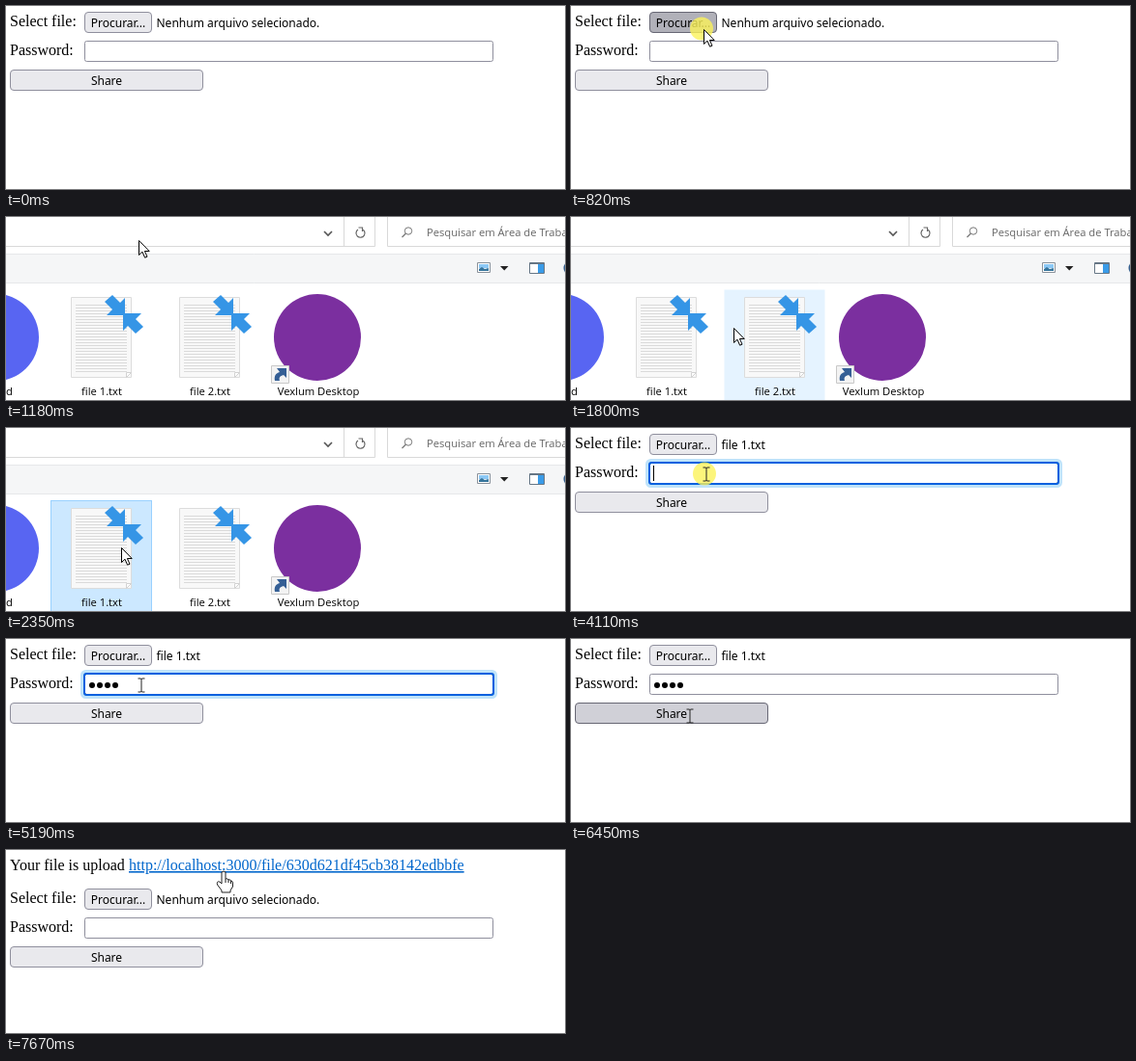
An HTML page for the animation above (8 s loop, 578x190 px).

```html
<!DOCTYPE html>
<html lang="pt">
<head>
<meta charset="utf-8">
<style>
  html, body { margin: 0; width: 100%; height: 100%; overflow: hidden; background: #fff; }
  svg { display: block; width: 578px; height: 190px; }
  .serif { font: 16px "Liberation Serif", serif; }
  .ui { font: 12px "Noto Sans", sans-serif; }
  .shell { font: 11.2px "Open Sans", sans-serif; }
  .control { stroke: #8f8f9d; }
  .button { fill: #e9e9ed; }
  .control.hover { stroke: #676774; }
  .button.hover { fill: #d0d0d7; }
  .button.press { fill: #b1b1b9; }
  .item { fill: none; }
  .item.hover { fill: #e5f3ff; }
  .item.selected { fill: #cce8ff; stroke: #99d1ff; }
  .mid { text-anchor: middle; }
</style>
</head>
<body>
<svg viewBox="0 0 578 190">
  <defs>
    <g id="doc">
      <path d="M67.5 83.5h62v83h-62z" fill="#f8f8f8" stroke="#dcdcdc"/>
      <path d="M98.5 91v70" stroke="#dadada" stroke-width="53" stroke-dasharray="1 2"/>
      <path d="M129.5 161.5h-5v5z" fill="#fff" stroke="#d2d2d2"/>
      <path id="squeeze" d="M123 102V84l-5 5-8-8-8 7 8 8-6 6z" fill="#3595e6"/>
      <use href="#squeeze" transform="rotate(180 122 101)"/>
    </g>
  </defs>

  <g id="page">
    <g id="message" class="serif">
      <text x="4" y="21">Your file is upload</text>
      <text x="127" y="21" fill="#0066cc" text-decoration="underline">http://localhost:3000/file/630d621df45cb38142edbbfe</text>
    </g>
    <g id="form">
      <text class="serif" x="4" y="21">Select file:</text>
      <text class="serif" x="4" y="51">Password:</text>
      <rect id="browse" class="control button" x="81.5" y="6.5" width="69" height="21" rx="3.5"/>
      <text class="ui mid" x="116" y="22">Procurar...</text>
      <text id="chosen" class="ui" x="155.5" y="22"></text>
      <rect id="field" class="control" x="81.5" y="36.5" width="422" height="21" rx="2" fill="#fff"/>
      <g id="focus" fill="none">
        <rect x="78.5" y="33.5" width="428" height="27" rx="4" stroke="#bfe3fa" stroke-width="3"/>
        <rect x="81" y="36" width="423" height="22" rx="2" stroke="#0060df" stroke-width="2"/>
      </g>
      <g id="dots"></g>
      <path id="caret" d="M85.5 39v16" stroke="#000"/>
      <rect id="share" class="control button" x="4.5" y="66.5" width="199" height="21" rx="3.5"/>
      <text class="ui mid" x="104" y="82">Share</text>
    </g>
  </g>

  <g id="dialog">
    <path d="M0 0h578v190H0z" fill="#fff"/>
    <path d="M0 30.5h381.5V0M349.5 0v30M394.5 0v30.5H578" fill="none" stroke="#d9d9d9"/>
    <path d="M329 15l4 4 4-4" fill="none" stroke="#555" stroke-width="1.6"/>
    <path d="M368 12.5a4.5 4.5 0 1 1-4 .5M364.500 11h4v4" fill="none" stroke="#666" stroke-width="1.2"/>
    <path d="M413.5 17l-4 4" stroke="#777" stroke-width="1.3"/>
    <circle cx="416" cy="14.5" r="3.7" fill="none" stroke="#777"/>
    <text class="shell" x="435" y="20" fill="#666">Pesquisar em Área de Trabalho</text>
    <path d="M0 38h578v31H0z" fill="#f5f6f7"/>
    <path d="M0 38.5h578M0 68.5h578" stroke="#e6e8ea"/>
    <path d="M487.5 47.5h13v10h-13z" fill="#fff" stroke="#8a929b"/>
    <path d="M489 49h10v4h-10z" fill="#8cc8f5"/>
    <path d="M489 56v-2l3-2 3 2 4-1v3z" fill="#35749b"/>
    <path d="M511 51h8.5l-4.250 4.5z" fill="#222"/>
    <path d="M541.5 47.5h15v11h-15z" fill="#fff" stroke="#667685"/>
    <path d="M550 48h6v10h-6z" fill="#3a9be8"/>
    <path d="M541 48.5h16" stroke="#667685"/>
    <circle cx="584" cy="53" r="7.5" fill="#35608f"/>
    <rect id="item1" class="item" x="46.5" y="75.5" width="104" height="120"/>
    <rect id="item2" class="item" x="158.5" y="75.5" width="104" height="120"/>
    <use href="#doc"/>
    <use href="#doc" x="112"/>
    <circle cx="-11.5" cy="125" r="45.5" fill="#5865f2"/>
    <circle cx="322" cy="125" r="45" fill="#7b2f9f"/>
    <path d="M274.5 154.5h18v18h-18z" fill="#f3f3f3" stroke="#c8c8c8"/>
    <path d="M278 170c-1-5 1-8 5-9l-3-4h10v10l-3-3c-4 1-5 3-4 6z" fill="#355f95"/>
    <g class="shell mid">
      <text x="3.5" y="185">d</text>
      <text x="99" y="185">file 1.txt</text>
      <text x="211" y="185">file 2.txt</text>
      <text x="323" y="185">Vexlum Desktop</text>
    </g>
  </g>

  <g id="cursor">
    <circle id="glow" cx="-2" cy="-.5" r="12" fill="#fbf25a"/>
    <path id="arrow" d="M.5.5v15l3.500-3.300 2.600 6 2.400-1-2.600-5.700h4.800z" fill="#fff" stroke="#000"/>
    <path id="beam" d="M-3.5-7h3l.5.5.5-.5h3M0-7V7M-3.5 7h3l.5-.5.5.5h3" fill="none" stroke="#222"/>
    <path id="hand" d="M-2 1Q0-1 2 1V8Q4 7 5 9Q7 8 7.5 10Q9.5 10 9.5 12V16L7 20V22H-2V20L-6.500 14Q-7.500 10-4 11L-2 13ZM2 8v4M5 9v3M7.500 10v3" fill="#fff" stroke="#222"/>
  </g>
</svg>
<script>
const LOOP = 8000;
const $ = id => document.getElementById(id);
const show = (id, on) => $(id).style.display = on ? '' : 'none';
const flag = (id, name, on) => $(id).classList.toggle(name, on);
const clamp = v => Math.max(0, Math.min(1, v));

for (let i = 0; i < 4; i++)
  $('dots').innerHTML += `<circle cx="${89 + 8 * i}" cy="48" r="3"/>`;

// start, end, steps, from, bend (quadratic control point), to
const moves = [
  [70, 550, 8, [310, 132], [230, 75], [137, 24]],
  [1380, 1940, 9, [137, 24], [258, 112], [119, 124]],
  [2750, 2940, 3, [119, 124], [123, 120], [125, 113]],
  [3010, 3080, 2, [125, 113], [125.5, 109], [126, 105]],
  [3150, 3770, 9, [126, 105], [134, 75], [140, 51]],
  [3840, 3910, 2, [140, 51], [140, 49], [140, 48]],
  [6050, 6240, 4, [140, 48], [130, 62], [123, 80]],
  [7250, 7670, 7, [123, 80], [178, 55], [225, 22]],
];
const clicks = [[820, 960], [2140, 2210], [2280, 2350], [4110, 4310], [6310, 6450]];
const keys = [4840, 4910, 4990, 5190];

function pointer(t) {
  const [t0, t1, n, a, b, c] = moves.findLast(m => t >= m[0]) || moves[0];
  const p = clamp((Math.floor((t - t0) / (t1 - t0) * (n - 1)) + 1) / n), q = 1 - p;
  return [0, 1].map(i => q * q * a[i] + 2 * p * q * b[i] + p * p * c[i]);
}

function draw(t) {
  const within = (a, b) => t >= a && t < b;
  const [x, y] = pointer(t);
  const uploaded = t >= 6520, shift = uploaded ? 34 : 0;
  const opacity = clamp((t - 900) / 200) * clamp((2680 - t) / 200);
  const inDialog = opacity > 0.5;
  const over = (id, dy = 0) => {
    const r = $(id).getBBox();
    return t >= 70 && x >= r.x && x <= r.x + r.width && y >= r.y + dy && y <= r.y + dy + r.height;
  };
  const pressed = clicks.some(c => within(...c));

  show('message', uploaded);
  $('form').setAttribute('transform', `translate(0 ${shift})`);
  for (const id of ['browse', 'field', 'share']) {
    const hover = !inDialog && over(id, shift);
    flag(id, 'hover', hover);
    flag(id, 'press', hover && pressed);
  }
  $('chosen').textContent = within(2480, 6520) ? 'file 1.txt' : 'Nenhum arquivo selecionado.';

  const focused = within(4110, 6310);
  const typed = uploaded ? 0 : keys.filter(k => t >= k).length;
  show('focus', focused);
  [...$('dots').children].forEach((dot, i) => dot.style.display = i < typed ? '' : 'none');
  show('caret', focused && !within(4640, 4840) && !within(5190, 5720));
  $('caret').setAttribute('transform', `translate(${8 * typed} 0)`);

  show('dialog', opacity > 0);
  $('dialog').style.opacity = opacity;
  flag('item1', 'hover', over('item1'));
  flag('item2', 'hover', over('item2'));
  flag('item1', 'selected', t >= 2140);

  const beam = !inDialog && (over('field', shift) || within(6050, 6520));
  const hand = uploaded && x > 127 && y < 26;
  show('cursor', t >= 70);
  $('cursor').setAttribute('transform', `translate(${Math.round(x)} ${Math.round(y)})`);
  show('glow', pressed);
  $('glow').style.opacity = within(4240, 4310) ? 0.4 : 0.8;
  show('beam', beam);
  show('hand', hand);
  show('arrow', !beam && !hand);
}

function frame() {
  draw(performance.now() % LOOP);
  requestAnimationFrame(frame);
}
frame();
</script>
</body>
</html>
```
